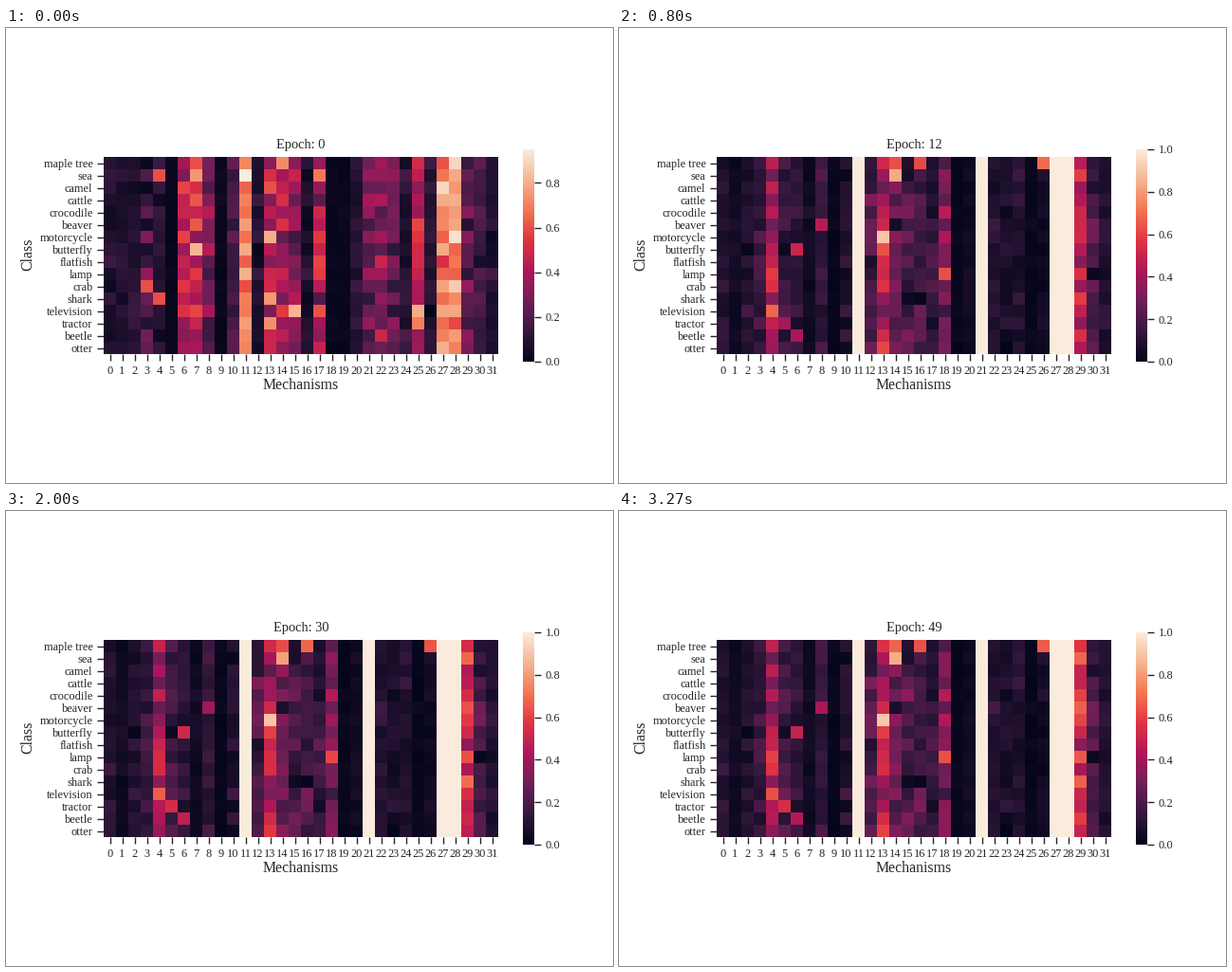
A matplotlib script for the animation above (3.34 s loop, 640 by 480 pixels).

```python
import numpy as np
import matplotlib.pyplot as plt
from matplotlib.animation import FuncAnimation
from matplotlib.colors import LinearSegmentedColormap

WIDTH, HEIGHT, DPI = 640, 480, 100
MECHANISMS, EPOCHS = 32, 50
TICK_MS, LOOP_MS = 20, 3340
INK = "#262626"

CLASSES = ["maple tree", "sea", "camel", "cattle", "crocodile", "beaver",
           "motorcycle", "butterfly", "flatfish", "lamp", "crab", "shark",
           "television", "tractor", "beetle", "otter"]
CMAP = LinearSegmentedColormap.from_list("heat", [
    "#03051a", "#35193e", "#701f57", "#ad1759",
    "#e13342", "#f37651", "#f6b48f", "#faebdd"])

# Typical activation -> mechanisms that share it; the others stay near LOW.
LOW = .09
START_LEVELS = {.74: (11, 27, 28), .52: (7,), .42: (6, 13, 14, 17, 25),
                .34: (15, 22), .26: (8, 21, 23, 29), .18: (3, 10, 30),
                .02: (5, 9, 18, 19)}
END_LEVELS = {1: (11, 21, 27, 28), .6: (29,), .38: (4, 13), .28: (14, 18),
              .2: (5, 12, 15, 16, 30), .13: (3, 6, 8, 17),
              .04: (1, 7, 20, 26), .015: (9, 19, 25)}

# A few classes that stand out: (class, mechanism, activation).
START_PEAKS = [("sea", 11, .95), ("sea", 7, .75), ("sea", 4, .6), ("sea", 17, .68),
               ("maple tree", 14, .72), ("maple tree", 28, .9), ("camel", 27, .9),
               ("motorcycle", 13, .8), ("shark", 13, .75), ("shark", 4, .6),
               ("crab", 3, .6), ("television", 15, .82), ("television", 25, .8)]
END_PEAKS = [("maple tree", 14, .65), ("maple tree", 16, .65), ("maple tree", 26, .65),
             ("sea", 14, .82), ("beaver", 8, .43), ("motorcycle", 13, .91),
             ("butterfly", 13, .63), ("butterfly", 6, .52), ("lamp", 18, .62),
             ("lamp", 4, .56), ("television", 4, .65), ("tractor", 5, .57),
             ("crab", 13, .55), ("beetle", 13, .56), ("beetle", 6, .43)]


def build_state(levels, peaks, seed):
    """Scatter the mechanism levels over the classes, then set the peaks."""
    rng = np.random.default_rng(seed)
    mean = np.full(MECHANISMS, LOW)
    for level, columns in levels.items():
        mean[list(columns)] = level
    scatter = rng.normal(size=(len(CLASSES), MECHANISMS))
    values = np.clip(mean + .42 * mean * (1 - mean) * scatter, 0, 1)
    for name, column, value in peaks:
        values[CLASSES.index(name), column] = value
    return values


initial = build_state(START_LEVELS, START_PEAKS, 2)
settled = build_state(END_LEVELS, END_PEAKS, 5)

# Most mechanisms settle at once; two keep learning.
settle_epochs = np.full(MECHANISMS, .4)
settle_epochs[[5, 29]] = 8


def activations(epoch):
    values = settled + (initial - settled) * np.exp(-epoch / settle_epochs)
    if epoch:
        jitter = np.random.default_rng(100 + epoch).normal(size=values.shape)
        values = values + .1 * values * (1 - values) * jitter
    return np.clip(values, 0, 1)


plt.rcParams.update({
    "font.family": "Liberation Serif", "font.size": 8.9, "text.color": INK,
    "xtick.color": INK, "ytick.color": INK})
fig = plt.figure(figsize=(WIDTH / DPI, HEIGHT / DPI), dpi=DPI, facecolor="white")


def pixel_axes(left, top, right, bottom):
    ax = fig.add_axes([left / WIDTH, 1 - bottom / HEIGHT,
                       (right - left) / WIDTH, (bottom - top) / HEIGHT])
    ax.spines[:].set_visible(False)
    ax.tick_params(length=4.8, width=1, pad=3.5)
    return ax


def pixel_text(x, y, text, **style):
    fig.text(x / WIDTH, 1 - y / HEIGHT, text, ha="center", va="baseline",
             fontsize=11.4, **style)


ax = pixel_axes(103, 136, 519, 344)
heat = ax.imshow(initial, cmap=CMAP, aspect="auto", interpolation="nearest")
ax.set_xticks(range(MECHANISMS))
ax.set_yticks(range(len(CLASSES)), CLASSES)
title = ax.set_title("", fontsize=10.4, pad=6.2)
pixel_text(311, 381, "Mechanisms")
pixel_text(27, 239, "Class", rotation=90, rotation_mode="anchor")

bar_ax = pixel_axes(545, 128, 557, 352)
bar_ax.yaxis.tick_right()
bar_ax.set_xticks([])
bar = bar_ax.imshow(np.linspace(0, 1, 256)[:, None], cmap=CMAP, origin="lower",
                    aspect="auto", extent=(0, 1, 0, 1))


def update(tick):
    # Fifteen epochs per second, each starting on a 10 ms boundary.
    epoch = min(int((2 * tick + 1.5) * .15), EPOCHS - 1)
    values = activations(epoch)
    top = round(values.max(), 2)
    heat.set_data(values)
    heat.set_clim(0, top)
    bar.set_extent((0, 1, 0, top))
    bar_ax.set_ylim(0, top)
    levels = [i / 5 for i in range(6) if i / 5 <= top]
    bar_ax.set_yticks(levels, [f"{level:.1f}" for level in levels])
    title.set_text(f"Epoch: {epoch}")
    return heat, bar, title


anim = FuncAnimation(fig, update, frames=LOOP_MS // TICK_MS, interval=TICK_MS,
                     repeat=True, repeat_delay=0, blit=False)
plt.show()
```
